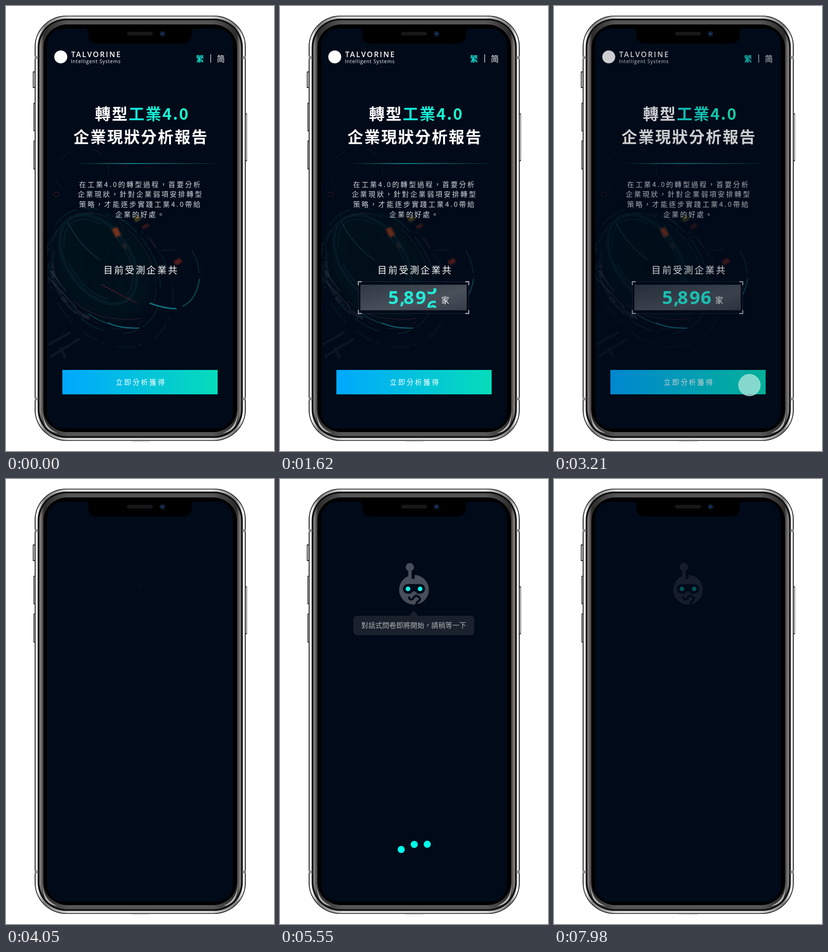
Animation, 580 px wide and 966 px high, one loop 8000 ms. Source, as an HTML page:

```html
<!DOCTYPE html>
<html lang="zh-Hant">
<head>
<meta charset="utf-8">
<title>工業4.0</title>
<style>
  html, body { margin: 0; width: 100%; height: 100%; overflow: hidden; background: #fff; }
  svg { display: block; width: 580px; height: 966px; }
  text { font-family: "Noto Sans CJK TC", "Noto Sans CJK", sans-serif; fill: #fff; }
  .latin { font-family: "Open Sans", "Noto Sans", sans-serif; }
  .title { font-size: 34px; font-weight: 700; letter-spacing: 2.5px; }
  .body { font-size: 15px; font-weight: 300; letter-spacing: 3.1px; text-anchor: middle; fill: #d2d6dc; }
  .digits { font: 700 40px "Noto Sans", "Open Sans", sans-serif; letter-spacing: 3px; fill: #22ecd8; }
  #robot { transform-origin: 290px 230px; }
</style>
</head>
<body>
<svg viewBox="0 0 580 966">
  <defs>
    <linearGradient id="silver">
      <stop offset="0" stop-color="#aaa"/><stop offset=".006" stop-color="#fff"/>
      <stop offset=".014" stop-color="#e8e8e8"/><stop offset=".045" stop-color="#777"/>
      <stop offset=".16" stop-color="#dcdcdc"/><stop offset=".84" stop-color="#dcdcdc"/>
      <stop offset=".955" stop-color="#777"/><stop offset=".986" stop-color="#e8e8e8"/>
      <stop offset=".994" stop-color="#fff"/><stop offset="1" stop-color="#aaa"/>
    </linearGradient>
    <linearGradient id="steel">
      <stop offset="0" stop-color="#8f8b89"/><stop offset=".008" stop-color="#726e6c"/>
      <stop offset=".022" stop-color="#2b2b2b"/><stop offset=".14" stop-color="#555"/>
      <stop offset=".86" stop-color="#555"/><stop offset=".978" stop-color="#2b2b2b"/>
      <stop offset=".992" stop-color="#726e6c"/><stop offset="1" stop-color="#8f8b89"/>
    </linearGradient>
    <linearGradient id="key">
      <stop offset="0" stop-color="#222"/><stop offset=".4" stop-color="#eee"/><stop offset="1" stop-color="#888"/>
    </linearGradient>
    <linearGradient id="cta">
      <stop offset="0" stop-color="#00a8ff"/><stop offset="1" stop-color="#05dcba"/>
    </linearGradient>
    <linearGradient id="mint" gradientUnits="userSpaceOnUse" x1="266" x2="390" y1="0" y2="0">
      <stop offset="0" stop-color="#12e2dc"/><stop offset="1" stop-color="#1dffcf"/>
    </linearGradient>
    <linearGradient id="rule">
      <stop offset="0" stop-color="#1fb5ad" stop-opacity="0"/><stop offset=".38" stop-color="#1fb5ad" stop-opacity=".75"/>
      <stop offset="1" stop-color="#1fb5ad" stop-opacity="0"/>
    </linearGradient>
    <linearGradient id="plate" x2="1" y2="1">
      <stop offset="0" stop-color="#2f3843"/><stop offset=".6" stop-color="#48505a"/><stop offset="1" stop-color="#363e49"/>
    </linearGradient>
    <radialGradient id="lens">
      <stop offset="0" stop-color="#01101b"/><stop offset=".75" stop-color="#02121d"/><stop offset="1" stop-color="#000a19"/>
    </radialGradient>
    <filter id="soft"><feGaussianBlur stdDeviation="2"/></filter>
    <clipPath id="glass"><rect x="89" y="49" width="402" height="868" rx="34"/></clipPath>
    <clipPath id="reel"><rect x="312" y="613" width="32" height="42"/></clipPath>
    <clipPath id="photo"><rect x="89" y="290" width="402" height="476"/></clipPath>
  </defs>

  <g id="shell"></g>
  <rect x="89" y="49" width="402" height="868" rx="34" fill="#000a19"/>

  <g clip-path="url(#glass)">
    <g id="page">
      <g id="scene" clip-path="url(#photo)"></g>

      <circle cx="118.5" cy="110.5" r="14" fill="#fff"/>
      <text class="latin" x="141" y="111" font-size="16" font-weight="600" letter-spacing="2.6">TALVORINE</text>
      <text class="latin" x="140.5" y="123.5" font-size="10.5" letter-spacing=".85">Intelligent Systems</text>
      <text x="411.5" y="120.5" font-size="17" font-weight="700" style="fill:#14e0d2">繁</text>
      <path d="M443 105V123" stroke="#ddd" stroke-width="1.4"/>
      <text x="456.5" y="120.5" font-size="17">简</text>

      <text class="title" x="192.5" y="246.5">轉型<tspan fill="url(#mint)">工業4.0</tspan></text>
      <text class="title" x="146" y="296.5">企業現狀分析報告</text>
      <rect x="150" y="341" width="318" height="2" fill="url(#rule)"/>
      <text class="body" x="291" y="392.5">在工業4.0的轉型過程，首要分析</text>
      <text class="body" x="291" y="414">企業現狀，針對企業弱項安排轉型</text>
      <text class="body" x="291" y="435.5">策略，才能逐步實踐工業4.0帶給</text>
      <text class="body" x="291" y="457.5">企業的好處。</text>
      <text x="211" y="581" font-size="20" letter-spacing="3.3">目前受測企業共</text>

      <g id="counter">
        <rect x="169.5" y="598.5" width="239" height="69" fill="#000a19" stroke="#59626c" stroke-opacity=".35"/>
        <rect x="174" y="605" width="230" height="55.5" fill="url(#plate)"/>
        <path d="M169.5 606V598.5H177M401 598.5H408.5V606M408.5 660V667.5H401M177 667.5H169.5V660" fill="none" stroke="#c9ced3" stroke-width="1.8"/>
        <text class="digits" x="234" y="647">5<tspan dx="-1">,</tspan><tspan dx="-6">89</tspan></text>
        <g clip-path="url(#reel)">
          <g id="roll">
            <text class="digits" x="317.5" y="647">5</text>
            <text class="digits" x="317.5" y="689">6</text>
          </g>
        </g>
        <text x="349" y="645" font-size="17">家</text>
      </g>

      <rect x="122" y="790" width="336" height="53" fill="url(#cta)"/>
      <text x="237.5" y="822" font-size="15" font-weight="500" letter-spacing="3.2">立即分析獲得</text>
    </g>
    <circle id="touch" cx="423" cy="823" r="23.5" fill="#b9ebe1" fill-opacity=".72" stroke="#c5efe8" stroke-opacity=".8"/>

    <g id="robot">
      <g fill="#474d59">
        <circle cx="290" cy="240.5" r="32.3"/>
        <path d="M288 198V213.5" stroke="#000a19" stroke-width="7" stroke-linecap="round"/>
        <rect x="277.5" y="191" width="7.2" height="28"/>
        <circle cx="281" cy="191.3" r="9"/>
      </g>
      <rect x="266" y="228" width="48" height="21" rx="10.5" fill="#000a19"/>
      <path d="M282 250Q290 237 298 250Z" fill="#474d59"/>
      <path d="M279 257q4 9 10 1t11-2q7 5-3 11l-3 7" fill="none" stroke="#000a19" stroke-width="4.5" stroke-linecap="round"/>
      <circle cx="277" cy="238.5" r="5" fill="#14f5e3"/>
      <circle cx="303.3" cy="238.5" r="5" fill="#14f5e3"/>
    </g>

    <g id="bubble">
      <path d="M277 298Q282 297 285 290Q289.5 284 294 290Q297 297 302 298Z" fill="#1a212c"/>
      <rect x="158.5" y="297" width="262" height="42" rx="8" fill="#1a212c"/>
      <text x="176" y="323.3" font-size="15" letter-spacing=".15" style="fill:#b0b3b8">對話式問卷即將開始，請稍等一下</text>
    </g>

    <g id="dots" fill="#00ffea">
      <circle cx="262.3" cy="804.3" r="7.7"/>
      <circle cx="290.5" cy="804.3" r="7.7"/>
      <circle cx="318.7" cy="804.3" r="7.7"/>
    </g>
  </g>

  <path d="M168 48H412Q402 49 402 57V61Q402 81.5 382 81.5H198Q178 81.5 178 61V57Q178 49 168 48Z" fill="#000"/>
  <rect x="262" y="56" width="56" height="8" rx="4" fill="#17171a"/>
  <circle cx="338.8" cy="60.3" r="6.3" fill="#10151d"/>
  <circle cx="338.8" cy="60.3" r="3.8" fill="#0a2347"/>
  <circle cx="337.3" cy="60" r="1.3" fill="#2a5b9b"/>
  <circle cx="340.7" cy="60" r="1" fill="#234a7c"/>
</svg>

<script>
const LOOP = 8000;
const $ = id => document.getElementById(id);
const rect = (x, y, w, h, rx, fill) =>
  `<rect x="${x}" y="${y}" width="${w}" height="${h}" rx="${rx}" fill="${fill}"/>`;

// Phone body: concentric layers, from the outline to the black bezel
const layers = [[0, 68, "#1a1a1a"], [1.6, 66.5, "url(#silver)"], [6.6, 62, "#050505"],
  [9, 60, "#262626"], [10.5, 58.5, "url(#steel)"], [19, 51, "#000"]];
const keys = [[58, 142, 5, 36], [59.5, 210, 4, 62], [59.5, 292, 4, 63], [517, 233, 4.5, 104]];
const bands = [[62, 109], [62, 850], [511.5, 109], [511.5, 850]];
const glare = "M79 876Q81 916 112 927Q92 925 84 909Q79 896 79 876Z";
$("shell").innerHTML =
  keys.map(([x, y, w, h]) => rect(x, y, w, h, 1.5, "#1c1c1c") + rect(x + 1, y + 2, w - 1.5, h - 4, 1, "url(#key)")).join("") +
  layers.map(([d, r, fill]) => rect(62 + d, 21 + d, 457 - 2 * d, 923 - 2 * d, r, fill)).join("") +
  bands.map(([x, y]) => rect(x, y, 7.5, 6, 0, "#8b8b8b")).join("") +
  `<path d="${glare}" fill="#b0b0b0"/>
   <path d="${glare}" fill="#b0b0b0" transform="matrix(-1 0 0 1 581 0)"/>` +
  rect(270, 942.5, 42, 2, 1, "#555");

// Dim machine backdrop
const ring = (cx, cy, rx, ry, turn, color, width, dash, alpha) =>
  `<ellipse cx="${cx}" cy="${cy}" rx="${rx}" ry="${ry}" transform="rotate(${turn} ${cx} ${cy})"
    fill="none" stroke="${color}" stroke-width="${width}" stroke-dasharray="${dash}" opacity="${alpha}"/>`;
const stroke = (d, color, width, alpha) =>
  `<path d="${d}" fill="none" stroke="${color}" stroke-width="${width}" opacity="${alpha}"/>`;
const glow = (x, y, w, h, color, alpha) =>
  `<rect x="${x - w / 2}" y="${y - h / 2}" width="${w}" height="${h}" transform="rotate(-28 ${x} ${y})"
    fill="${color}" opacity="${alpha}" filter="url(#soft)"/>`;
const plates = Array.from({ length: 9 }, (_, i) => {
  const a = 3.3 - i * .17, x = 212 + 112 * Math.cos(a), y = 560 + 122 * Math.sin(a);
  return `<rect x="${x - 9}" y="${y - 4}" width="18" height="8" fill="#56616b" opacity="${.1 + (i % 3) * .07}"
    transform="rotate(${a * 57.3 + 90} ${x} ${y})"/>`;
}).join("");
$("scene").innerHTML =
  `<ellipse cx="210" cy="565" rx="112" ry="145" transform="rotate(-35 210 565)" fill="url(#lens)"/>` +
  ring(212, 575, 108, 148, -35, "#0d3a42", 2.5, "60 14 30 40", .45) +
  ring(212, 575, 99, 137, -35, "#40313d", 1.5, "50 30 12 8", .4) +
  ring(200, 550, 68, 108, -35, "#0f3c43", 7, "none", .28) +
  ring(200, 550, 60, 98, -35, "#12505a", 1.5, "120 40", .4) +
  ring(225, 595, 122, 158, -38, "#123843", 4, "8 6 40 30", .25) +
  ring(320, 560, 104, 100, 0, "#0c2c38", 1.5, "50 40 6 9", .28) +
  ring(165, 360, 58, 50, -20, "#39434d", 1.5, "28 22 4 19", .28) +
  ring(109, 409, 6, 5, 0, "#93382b", 1.5, "none", .35) +
  plates +
  stroke("M133 468Q158 520 205 552", "#1a6466", 1.3, .6) +
  stroke("M205 604L283 645", "#9e3434", 1.3, .6) +
  stroke("M311 645Q342 657 369 657", "#16838f", 3, .85) +
  stroke("M382 652Q412 638 419 592", "#13616c", 2.5, .7) +
  stroke("M418 580Q416 552 402 530", "#124c58", 2, .5) +
  stroke("M220 688Q250 701 288 699", "#168392", 2.5, .75) +
  stroke("M178 668Q200 684 224 690", "#145a66", 2, .7) +
  stroke("M146 640Q200 690 296 678", "#6b3340", 1.3, .4) +
  stroke("M336 530H368", "#1b3f48", 1.5, .5) +
  stroke("M92 590L152 655M98 575L130 620", "#6b7780", 2, .25) +
  stroke("M92 735L140 708M96 762L160 722M118 742L130 765", "#566069", 6, .16) +
  glow(239, 491, 13, 20, "#a93c1e", .7) + glow(284, 461, 14, 12, "#8e6f20", .5) +
  glow(302, 478, 16, 8, "#93351f", .4) + glow(372, 555, 16, 11, "#9c321f", .55) +
  glow(257, 521, 8, 12, "#6c3426", .35) + glow(317, 512, 5, 26, "#6d2a22", .25);

// A track is a list of [ms, value, easing]
function play(el, prop, track) {
  const steps = [...track];
  if (steps[0][0] > 0) steps.unshift([0, steps[0][1]]);
  const last = steps[steps.length - 1];
  if (last[0] < LOOP) steps.push([LOOP, last[1]]);
  const frames = steps.map(([ms, value, easing = "linear"]) => ({ offset: ms / LOOP, [prop]: value, easing }));
  el.animate(frames, { duration: LOOP, iterations: Infinity }).startTime = start;
}
const start = document.timeline.currentTime ?? 0;
const shift = (x, y) => `translate(${x}px, ${y}px)`;

play($("page"), "opacity", [[3120, 1], [3570, 0]]);
play($("scene"), "opacity", [[0, 1], [1400, .85]]);
play($("counter"), "opacity", [[300, 0], [660, 1]]);
play($("roll"), "transform", [[1440, shift(0, 0), "ease-in-out"], [1800, shift(0, -42)]]);
play($("touch"), "transform", [[2220, shift(96, 6), "ease-out"], [2790, shift(0, 0)]]);
play($("touch"), "opacity", [[3210, 1], [3570, 0]]);

play($("robot"), "transform", [[4020, "scale(0)"], [4050, "scale(.02)"], [5000, "scale(1)"]]);
play($("robot"), "opacity", [[7500, 1], [LOOP, .27]]);
play($("bubble"), "opacity", [[4400, 0], [4860, 1], [7320, 1], [7740, 0]]);
play($("dots"), "opacity", [[4480, 0], [4740, 1], [7300, 1], [7620, 0]]);

const HOP = 627;
[...$("dots").children].forEach((dot, i) => {
  const track = [];
  for (let t = 4766 + i * HOP / 2; t + HOP < LOOP; t += 2 * HOP) {
    track.push([t, shift(0, 0), "ease-in-out"], [t + HOP / 2, shift(0, -22.5), "ease-in-out"], [t + HOP, shift(0, 0)]);
  }
  play(dot, "transform", track);
});
</script>
</body>
</html>
```
